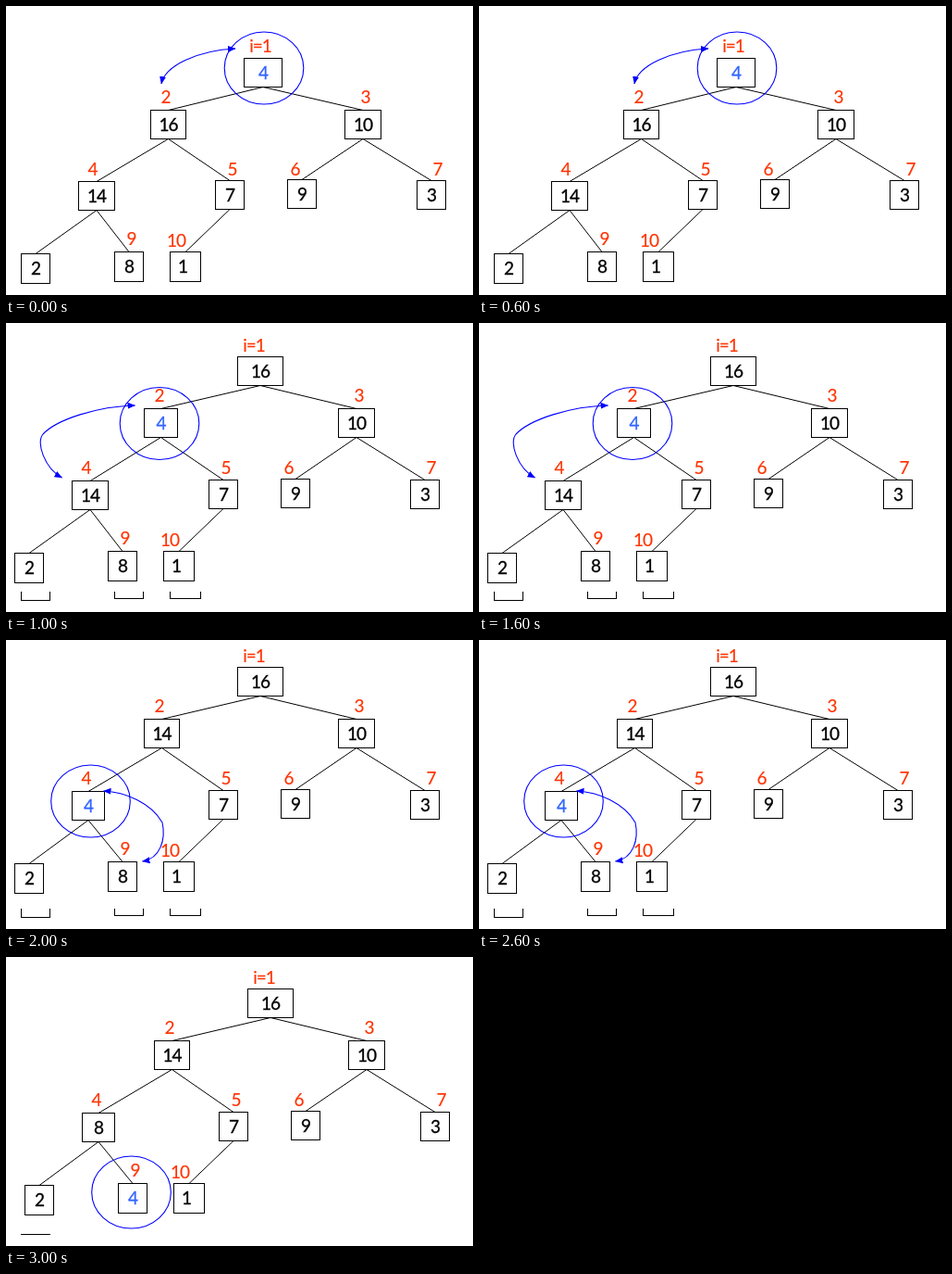
Recreate the animation shown at these times as an HTML page. Size 505 by 312 pixels, loop 4000 ms.

```html
<!DOCTYPE html>
<html lang="en">
<head>
<meta charset="utf-8">
<title>Heapify</title>
<style>
  html, body { margin: 0; width: 100%; height: 100%; overflow: hidden; background: #fff; }
  svg { display: block; width: 505px; height: 312px; }
  .step { visibility: hidden; animation: show 4s step-end infinite; }
  @keyframes show {
    0% { visibility: visible; }
    25%, 100% { visibility: hidden; }
  }
  rect.box { fill: #fff; stroke: #000; }
  .edge { stroke: #000; }
  .ring, .arrow { fill: none; stroke: #00f; stroke-width: 1.1; }
  text { font: 19px Lato, "Open Sans", sans-serif; letter-spacing: -1px; text-anchor: middle; fill: #000; stroke: #000; stroke-width: .3px; }
  text.label { fill: #f30; stroke: #f30; stroke-width: .15px; }
  text.active { fill: #36f; stroke: #36f; }
</style>
</head>
<body>
<svg id="stage" viewBox="0 0 505 312">
  <defs>
    <marker id="tip" markerUnits="userSpaceOnUse" markerWidth="9" markerHeight="8" refX="8" refY="4" orient="auto-start-reverse">
      <path d="M0 .5L8.5 4L0 7.5Z" fill="#00f"/>
    </marker>
    <clipPath id="low"><rect y="290" width="505" height="22"/></clipPath>
    <clipPath id="floor"><rect y="299" width="505" height="13"/></clipPath>
  </defs>
</svg>
<script>
const stage = document.getElementById('stage');

// Box position and size, label centre, parent
const nodes = [
  { x: 250, y: 29.3, w: 49, h: 31, label: 'i=1', lx: 268, ly: 17 },
  { x: 149, y: 85.2, w: 38, h: 31, label: '2', lx: 165.5, ly: 71.5, up: 0 },
  { x: 359, y: 85.2, w: 39, h: 31, label: '3', lx: 381.5, ly: 71.5, up: 0 },
  { x: 71, y: 162.9, w: 39, h: 31, label: '4', lx: 86.5, ly: 149.5, up: 1 },
  { x: 219, y: 162, w: 31, h: 31, label: '5', lx: 237.5, ly: 149.5, up: 1 },
  { x: 297, y: 161, w: 31, h: 31, label: '6', lx: 305.5, ly: 149.5, up: 2 },
  { x: 437, y: 162, w: 31, h: 31, label: '7', lx: 459.5, ly: 149.5, up: 2 },
  { x: 9, y: 241, w: 31, h: 32, up: 3 },
  { x: 110, y: 239, w: 31, h: 32, label: '9', lx: 128.5, ly: 225, up: 3 },
  { x: 170, y: 239, w: 33, h: 32, label: '10', lx: 177, ly: 227, up: 4, shift: -3 }
];

const steps = [
  { dx: 7, dy: 26.4, heap: [4, 16, 10, 14, 7, 9, 3, 2, 8, 1], active: 0, widths: { 0: 41 },
    ring: [279, 67], arrow: 'M168 84C172 64 208 48 248 46' },
  { dx: 0, dy: 7, heap: [16, 4, 10, 14, 7, 9, 3, 2, 8, 1], active: 1, widths: { 1: 36 },
    ring: [166, 108.5], arrow: 'M139.5 89C99 90 55 104 40 120C32 129 42 157 60.5 167', rest: 'low' },
  { dx: 0, dy: 0, heap: [16, 14, 10, 4, 7, 9, 3, 2, 8, 1], active: 3, widths: { 3: 35 },
    ring: [91.5, 174], arrow: 'M105.5 163C129 164 157 176 169 197C173 215 167 236 147.5 239', rest: 'low' },
  { dx: 11, dy: 5, heap: [16, 14, 10, 8, 7, 9, 3, 2, 4, 1], active: 8, widths: { 3: 35 },
    ring: [135.5, 254], rest: 'floor' }
];

function add(parent, tag, attrs, text) {
  const el = document.createElementNS('http://www.w3.org/2000/svg', tag);
  for (const key in attrs) el.setAttribute(key, attrs[key]);
  if (text !== undefined) el.textContent = text;
  return parent.appendChild(el);
}

function place(step) {
  return nodes.map((n, i) => {
    const w = step.widths[i] || n.w;
    const x = n.x + step.dx + .5;
    const y = Math.round(n.y + step.dy) + .5;
    return { x, y, w, h: n.h, cx: x + w / 2, bottom: y + n.h };
  });
}

function drawBox(parent, b) {
  add(parent, 'rect', { class: 'box', x: b.x, y: b.y, width: b.w, height: b.h });
}

function write(parent, cls, x, cy, text) {
  add(parent, 'text', { class: cls, x, y: cy + 6.8 }, text);
}

const first = place(steps[0]);

steps.forEach((step, k) => {
  const g = add(stage, 'g', { class: 'step', style: `animation-delay:${k ? k - 4 : 0}s` });
  const boxes = place(step);

  // Lower parts of the first leaves stay behind
  if (step.rest) {
    const rest = add(g, 'g', { 'clip-path': `url(#${step.rest})` });
    first.slice(7).forEach(b => drawBox(rest, b));
  }

  boxes.forEach((b, i) => {
    const p = boxes[nodes[i].up];
    if (p) add(g, 'line', { class: 'edge', x1: p.cx, y1: p.bottom, x2: b.cx, y2: b.y });
  });

  boxes.forEach((b, i) => {
    const n = nodes[i];
    drawBox(g, b);
    write(g, i === step.active ? 'active' : '', b.cx + (n.shift || 0), b.y + b.h / 2, step.heap[i]);
    if (n.label) write(g, 'label', n.lx + step.dx, n.ly + step.dy, n.label);
  });

  add(g, 'ellipse', { class: 'ring', cx: step.ring[0], cy: step.ring[1], rx: 42.8, ry: 39 });
  if (step.arrow) {
    add(g, 'path', { class: 'arrow', d: step.arrow, 'marker-start': 'url(#tip)', 'marker-end': 'url(#tip)' });
  }
});
</script>
</body>
</html>
```
